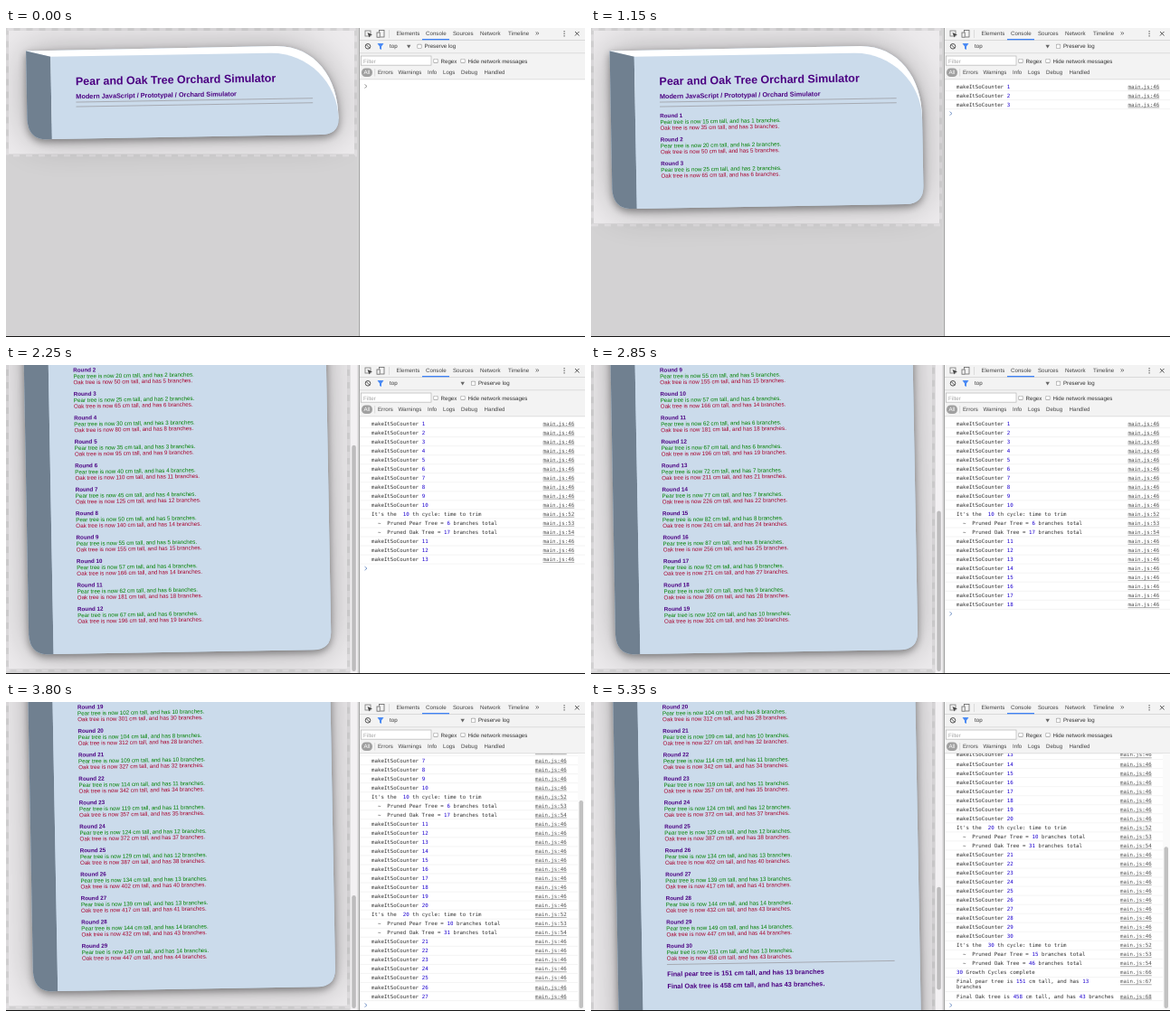
These frames come from a looping animation (640 by 342 pixels, 5400 ms). An HTML page with a canvas:

```html
<!DOCTYPE html>
<html lang="en">
<head>
<meta charset="utf-8">
<title>Orchard Simulator</title>
<style>
html, body { margin: 0; width: 100%; height: 100%; overflow: hidden; background: #d3d2d3; }
canvas { display: block; width: 640px; height: 342px; }
</style>
</head>
<body>
<canvas id="stage"></canvas>
<script>
const LOOP = 5400, PITCH = 26.45, VIEW = 340, ROW = 10.04, LOG_TOP = 57;
const SANS = '"Liberation Sans", Arial, sans-serif';
const MONO = '"DejaVu Sans Mono", Menlo, monospace';
const INDIGO = '#4b0082', BLUE = '#1c00cf';

const canvas = document.getElementById('stage');
const ctx = canvas.getContext('2d');
const dpr = window.devicePixelRatio || 1;
canvas.width = 640 * dpr;
canvas.height = 342 * dpr;
ctx.textRendering = 'geometricPrecision';

// Time (ms) to count; the console falls behind the page for a while.
const pageKeys = [[920, 1], [1150, 3], [1600, 7.2], [2250, 12.9], [3400, 25.2], [3800, 29.2], [3890, 30]];
const logKeys = [[920, 1], [1150, 3], [1600, 7.2], [2250, 13.1], [3000, 20.2], [3450, 20.9], [3800, 27.2], [4000, 30]];
const FINISH = 4050, RELOAD = 600;

function count(keys, t) {
  if (t < keys[0][0]) return 0;
  for (let i = 1; i < keys.length; i++) {
    const [t0, a] = keys[i - 1], [t1, b] = keys[i];
    if (t < t1) return Math.floor(a + (b - a) * (t - t0) / (t1 - t0));
  }
  return 30;
}

// Tree growth: every tenth round trims both trees.
const decade = r => Math.floor((r - 1) / 10);
const pearFull = r => Math.floor((r + 2 - decade(r)) / 2);
const oakFull = r => Math.floor((3 * r + 4 - decade(r)) / 2);
const trim = (r, cut) => r % 10 ? 0 : cut;
const pear = r => `${10 + 5 * r - 3 * Math.floor(r / 10)} cm tall, and has ${pearFull(r) - trim(r, 2)} branches`;
const oak = r => `${20 + 15 * r - 4 * Math.floor(r / 10)} cm tall, and has ${oakFull(r) - trim(r, 3)} branches`;

function rect(x, y, w, h, color) {
  ctx.fillStyle = color;
  ctx.fillRect(x, y, w, h);
}

// y is the middle of the capitals
function text(s, x, y, size, color, weight = '', family = SANS) {
  ctx.font = `${weight} ${size}px ${family}`;
  ctx.fillStyle = color;
  ctx.fillText(s, x, y + size * 0.35);
}

function line(x0, y0, x1, y1, color, width = 1) {
  ctx.strokeStyle = color;
  ctx.lineWidth = width;
  ctx.beginPath();
  ctx.moveTo(x0, y0);
  ctx.lineTo(x1, y1);
  ctx.stroke();
}

function pill(x, y, w, h, r, color) {
  ctx.fillStyle = color;
  ctx.beginPath();
  ctx.roundRect(x, y, w, h, r);
  ctx.fill();
}

function shadow(path, alpha, blur, drop) {
  ctx.save();
  ctx.shadowColor = `rgba(0,0,0,${alpha})`;
  ctx.shadowBlur = blur * dpr;
  ctx.shadowOffsetY = drop * dpr;
  ctx.fillStyle = '#cbdbeb';
  ctx.fill(path);
  ctx.restore();
}

function drawBox(w, h) {
  const R = 74, r = 20;
  const side = new Path2D(), top = new Path2D(), front = new Path2D(), all = new Path2D();

  side.moveTo(-27, -6.7);
  side.lineTo(0, 0);
  side.lineTo(0, h);
  side.lineTo(-8, h);
  side.quadraticCurveTo(-26, h - 1, -27, h - 22);
  side.closePath();

  top.moveTo(-27, -6.7);
  top.lineTo(w - 67, -7.5);
  top.bezierCurveTo(w - 25, -7, w + 1, 28, w, R);
  top.lineTo(0, R);
  top.lineTo(0, 0);
  top.closePath();

  front.moveTo(0, 0);
  front.lineTo(w - R, 0);
  front.bezierCurveTo(w - R * 0.45, 0, w, R * 0.45, w, R);
  front.lineTo(w, Math.max(R, h - r));
  front.quadraticCurveTo(w, h, w - r, h);
  front.lineTo(0, h);
  front.closePath();

  all.addPath(side);
  all.addPath(top);
  all.addPath(front);
  shadow(all, 0.3, 40, 0);
  shadow(all, 0.4, 9, 3);

  for (const [path, color] of [[top, '#fff'], [side, '#708090'], [front, '#cbdbeb']]) {
    ctx.fillStyle = color;
    ctx.fill(path);
  }
}

function drawPage(t) {
  const n = count(pageKeys, t), done = t >= FINISH;
  const base = n ? 141 + 26.3 * n : 143;
  const height = base + (done ? 60 : 0);
  const scroll = Math.max(0, base - VIEW);
  const bar = height > 341;
  const right = bar ? 380 : 388, w = bar ? 307 : 317;

  ctx.save();
  ctx.beginPath();
  ctx.rect(0, 0, 389, 341);
  ctx.clip();
  rect(0, 0, 389, 341, '#d3d2d3');

  ctx.save();
  ctx.translate(0, -scroll);
  rect(3, 3, right - 6, height - 6.5, '#edebed');
  ctx.setLineDash([7, 7]);
  ctx.strokeStyle = '#e0dee0';
  ctx.lineWidth = 3;
  ctx.strokeRect(1.5, 1.5, right - 3, height - 3.5);
  ctx.setLineDash([]);

  // The slab leans a little more as it grows.
  const left = 49.2 - 0.07 * Math.pow(height - 143, 0.7);
  ctx.transform(1, -0.0165, 0.018, 1, left, 31.7);
  drawBox(w, height - 51.7);

  const x = 27.3, at = y => y - 31.2;
  const rule = y => line(x, at(y), w - 28, at(y), '#9d9fa5', 0.8);
  text('Pear and Oak Tree Orchard Simulator', x, at(58.8), 12.44, INDIGO, 'bold');
  text('Modern JavaScript / Prototypal / Orchard Simulator', x, at(75.6), 7.3, INDIGO, 'bold');
  rule(82);
  rule(87);
  for (let i = 1; i <= n; i++) {
    const y = at(base - 70 - (n - i) * PITCH);
    text(`Round ${i}`, x, y, 6.24, INDIGO, 'bold');
    text(`Pear tree is now ${pear(i)}.`, x, y + 7, 6.24, '#008000');
    text(`Oak tree is now ${oak(i)}.`, x, y + 13.6, 6.24, '#a8002c');
  }
  if (done) {
    rule(base - 49.5);
    text(`Final pear tree is ${pear(30)}`, x, at(base - 39), 7.3, INDIGO, 'bold');
    text(`Final Oak tree is ${oak(30)}.`, x, at(base - 25.5), 7.3, INDIGO, 'bold');
  }
  ctx.restore();

  if (bar) {
    rect(380.5, 0, 8, 341, '#f3f1f3');
    pill(382.3, 2 + scroll / height * VIEW, 4.5, VIEW * VIEW / height - 3, 2.2, '#bdbcbd');
  }
  ctx.restore();
}

function logRows(n, done) {
  const rows = [];
  const add = (s, src, size = 1) => rows.push({ s, src, size });
  for (let i = 1; i <= n; i++) {
    add(`makeItSoCounter ${i}`, 46);
    if (i % 10) continue;
    add(`It's the  ${i} th cycle: time to trim`, 52);
    add(`  ~  Pruned Pear Tree = ${pearFull(i)} branches total`, 53);
    add(`  ~  Pruned Oak Tree = ${oakFull(i)} branches total`, 54);
  }
  if (done) {
    add('30 Growth Cycles complete', 66);
    add(`Final pear tree is ${pear(30).replace(' branches', '\nbranches')}`, 67, 1.6);
    add(`Final Oak tree is ${oak(30)}`, 68);
  }
  return rows;
}

function logText(s, x, y) {
  const size = 5.78, step = size * 0.602;
  s.split('\n').forEach((part, k) => {
    for (const m of part.matchAll(/\d+|[^\d]+/g))
      text(m[0], x + m.index * step, y + k * 6, size, /\d/.test(m[0]) ? BLUE : '#303030', '', MONO);
  });
}

function drawLog(t) {
  const rows = logRows(count(logKeys, t), t >= FINISH);
  const total = rows.reduce((sum, r) => sum + r.size, 1);
  const over = Math.max(0, total - 28);
  const end = over ? 620 : 628.5;

  ctx.save();
  ctx.beginPath();
  ctx.rect(391, LOG_TOP, 249, 341 - LOG_TOP);
  ctx.clip();
  let y = 64.5 - over * ROW;
  for (const { s, src, size } of rows) {
    if (y > 40) {
      const start = end - 35;
      logText(s, 404, y);
      text(`main.js:${src}`, start, y, 5.78, '#545454', '', MONO);
      line(start, y + 3.3, end - 0.3, y + 3.3, '#545454', 0.5);
      line(391, y + ROW * size - 5, over ? 632 : 640, y + ROW * size - 5, '#f0f0f0', 0.7);
    }
    y += ROW * size;
  }
  ctx.strokeStyle = rows.length ? '#6f8fc4' : '#8a8a8a';
  ctx.lineWidth = 0.9;
  ctx.beginPath();
  ctx.moveTo(396.5, y - 2);
  ctx.lineTo(399, y);
  ctx.lineTo(396.5, y + 2);
  ctx.stroke();
  if (over) {
    rect(632, LOG_TOP, 8, 284, '#fafafa');
    pill(633.5, LOG_TOP + 2 + 283 * over / total, 4.5, 283 * 28 / total - 3, 2.2, '#c1c1c1');
  }
  ctx.restore();
}

function checkbox(x, y, label) {
  pill(x - 2.5, y - 2.5, 5, 5, 1, '#9a9a9a');
  pill(x - 1.9, y - 1.9, 3.8, 3.8, 0.6, '#fff');
  text(label, x + 5.5, y, 6.18, '#333');
}

function labels(y, items) {
  for (const [s, x] of items) text(s, x, y, 6.18, '#444');
}

function frame(x, y, w, h, color) {
  ctx.strokeStyle = color;
  ctx.lineWidth = 0.8;
  ctx.strokeRect(x, y, w, h);
}

function drawTools(t) {
  rect(389, 0, 251, 342, '#fff');
  rect(389, 0, 1.2, 342, '#d8d8d8');
  rect(390.2, 0, 0.9, 342, '#8d8d8d');
  rect(391, 0, 249, LOG_TOP - 0.5, '#f3f3f3');
  for (const y of [13, 27.5, 56.5]) rect(391, y, 249, 0.7, '#cfcfcf');

  // tab bar
  frame(397, 3, 6, 6, '#777');
  ctx.fillStyle = '#444';
  ctx.beginPath();
  ctx.moveTo(399.5, 5);
  ctx.lineTo(405, 7.5);
  ctx.lineTo(402.5, 8.2);
  ctx.lineTo(401.5, 10.5);
  ctx.fill();
  frame(412.5, 2.5, 5.5, 7.5, '#666');
  rect(409.7, 4.7, 4, 6, '#f3f3f3');
  frame(410, 5, 3.2, 5.2, '#666');
  rect(423, 2, 0.6, 9, '#ccc');
  labels(6.2, [['Elements', 431.5], ['Console', 464], ['Sources', 494], ['Network', 524], ['Timeline', 555]]);
  text('»', 585, 5.6, 8, '#555');
  rect(460, 12, 30, 1.3, '#3e82f7');
  for (const y of [3.2, 5.7, 8.2]) rect(616.5, y, 1.2, 1.2, '#555');
  line(629, 4, 633.5, 8.5, '#555');
  line(633.5, 4, 629, 8.5, '#555');

  // context bar
  ctx.strokeStyle = '#555';
  ctx.lineWidth = 1;
  ctx.beginPath();
  ctx.arc(400, 20.3, 2.8, 0, 7);
  ctx.stroke();
  line(398, 18.3, 402, 22.3, '#555');
  ctx.fillStyle = '#4a8af4';
  ctx.beginPath();
  ctx.moveTo(410.5, 17);
  ctx.lineTo(417.5, 17);
  ctx.lineTo(415, 20.5);
  ctx.lineTo(415, 24);
  ctx.lineTo(413, 23);
  ctx.lineTo(413, 20.5);
  ctx.fill();
  const shift = t < RELOAD ? 0 : 59.5;
  text('top', 424, 20.3, 6.18, '#333');
  ctx.fillStyle = '#666';
  ctx.beginPath();
  ctx.moveTo(443 + shift, 18.8);
  ctx.lineTo(447.4 + shift, 18.8);
  ctx.lineTo(445.2 + shift, 22.4);
  ctx.fill();
  checkbox(457 + shift, 20.3, 'Preserve log');

  // filter bar
  rect(392.5, 31, 77.5, 10.2, '#fff');
  frame(392.5, 31, 77.5, 10.2, '#bdbdbd');
  text('Filter', 395, 36.6, 6.18, '#a5a5a5');
  checkbox(475, 36.4, 'Regex');
  checkbox(505, 36.4, 'Hide network messages');

  // level bar
  pill(393, 44.5, 12, 9.5, 4.5, '#a0a0a0');
  text('All', 395.4, 49.3, 6.18, '#fff');
  rect(407.5, 45, 0.6, 8.5, '#ccc');
  labels(49.3, [['Errors', 411], ['Warnings', 433.5], ['Info', 466], ['Logs', 483], ['Debug', 503], ['Handled', 528.5]]);

  drawLog(t);
  rect(0, 341, 640, 1, '#151515');
}

let start;
function tick(now) {
  start ??= now;
  const t = (now - start) % LOOP;
  ctx.setTransform(dpr, 0, 0, dpr, 0, 0);
  drawPage(t);
  drawTools(t);
  requestAnimationFrame(tick);
}
requestAnimationFrame(tick);
</script>
</body>
</html>
```
